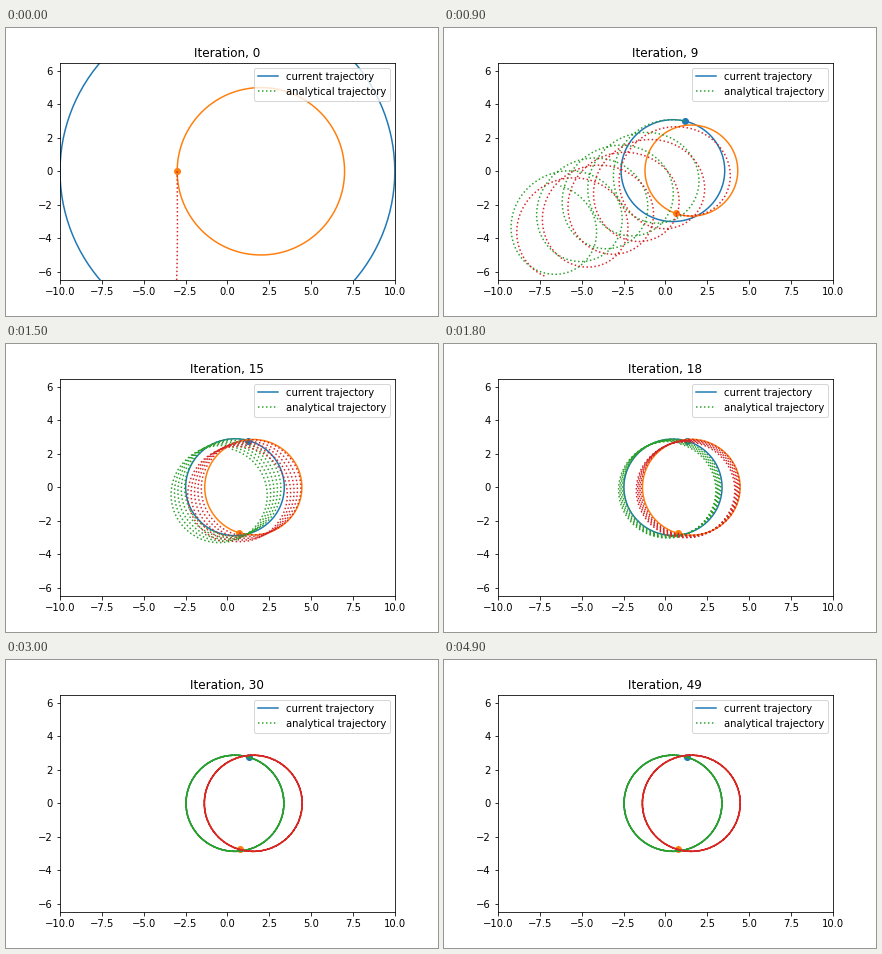
Animation, 432 px wide and 288 px high, one loop 5 s. Source, as a matplotlib script:

```python
import numpy as np
import matplotlib.pyplot as plt
from matplotlib.animation import FuncAnimation

plt.rcParams["text.kerning_factor"] = 6

ITERATIONS = 50
DESCENT_STEPS = 20      # gradient steps per shown iteration
RATE = 1 / 60
STRENGTH = 100          # gravitational pull on each body at unit distance
SAMPLES = 128
MAX_MODE = 6
PERIODS = 5
ODE_STEPS = 1000

modes = np.fft.fftfreq(SAMPLES, 1 / SAMPLES)
kept = np.abs(modes) <= MAX_MODE


def pull(paths):
    """Accelerations of two attracting bodies; positions are complex numbers."""
    gap = paths[0] - paths[1]
    force = STRENGTH * gap / np.abs(gap) ** 3
    return np.array([-force, force])


def descend(coeffs):
    """Gradient descent on the action of a periodic two-body path."""
    for _ in range(DESCENT_STEPS):
        force = np.fft.fft(pull(np.fft.ifft(coeffs)))
        gradient = modes ** 2 * coeffs + force
        coeffs = (coeffs - RATE * gradient) * kept
    return coeffs


def integrate(pos, vel):
    """RK4 solution of the equations of motion for all iterations at once."""
    dt = 2 * np.pi * PERIODS / ODE_STEPS
    track = [pos]
    for _ in range(ODE_STEPS):
        a1 = pull(pos)
        v2 = vel + dt / 2 * a1
        a2 = pull(pos + dt / 2 * vel)
        v3 = vel + dt / 2 * a2
        a3 = pull(pos + dt / 2 * v2)
        v4 = vel + dt * a3
        a4 = pull(pos + dt * v3)
        pos = pos + dt / 6 * (vel + 2 * v2 + 2 * v3 + v4)
        vel = vel + dt / 6 * (a1 + 2 * a2 + 2 * a3 + a4)
        track.append(pos)
    return np.array(track)


turn = np.exp(2j * np.pi * np.arange(SAMPLES) / SAMPLES)
coeffs = np.fft.fft(np.array([10j * turn, 2 - 5 * turn]))
history = [coeffs]
for _ in range(ITERATIONS - 1):
    history.append(descend(history[-1]))
history = np.array(history)

current = np.fft.ifft(history)
current = np.concatenate([current, current[..., :1]], axis=-1)
speed = np.fft.ifft(1j * modes * history)[..., 0]
solved = integrate(current[..., 0].T, speed.T)

fig, ax = plt.subplots(figsize=(6, 4), dpi=72)
fig.subplots_adjust(left=0.125, right=0.9, bottom=0.125, top=0.88)
half_height = 10 * (0.755 * 4) / (0.775 * 6)
ax.set_xlim(-10, 10)
ax.set_ylim(-half_height, half_height)
ax.set_xticks(np.arange(-10, 10.1, 2.5))
ax.set_yticks(np.arange(-6, 7, 2))

current_lines = [ax.plot([], [], color=c)[0] for c in ("C0", "C1")]
solved_lines = [ax.plot([], [], ":", color=c)[0] for c in ("C2", "C3")]
dots = [ax.scatter([0], [0], color=c) for c in ("C0", "C1")]
ax.legend([current_lines[0], solved_lines[0]],
          ["current trajectory", "analytical trajectory"], loc="upper right")
title = ax.set_title("")


def update(i):
    for body in range(2):
        path = current[i, body]
        orbit = solved[:, body, i]
        current_lines[body].set_data(path.real, path.imag)
        solved_lines[body].set_data(orbit.real, orbit.imag)
        dots[body].set_offsets([[path[0].real, path[0].imag]])
    title.set_text(f"Iteration, {i}")
    return [*current_lines, *solved_lines, *dots, title]


anim = FuncAnimation(fig, update, frames=ITERATIONS, interval=100,
                     repeat=True, repeat_delay=0)
plt.show()
```
